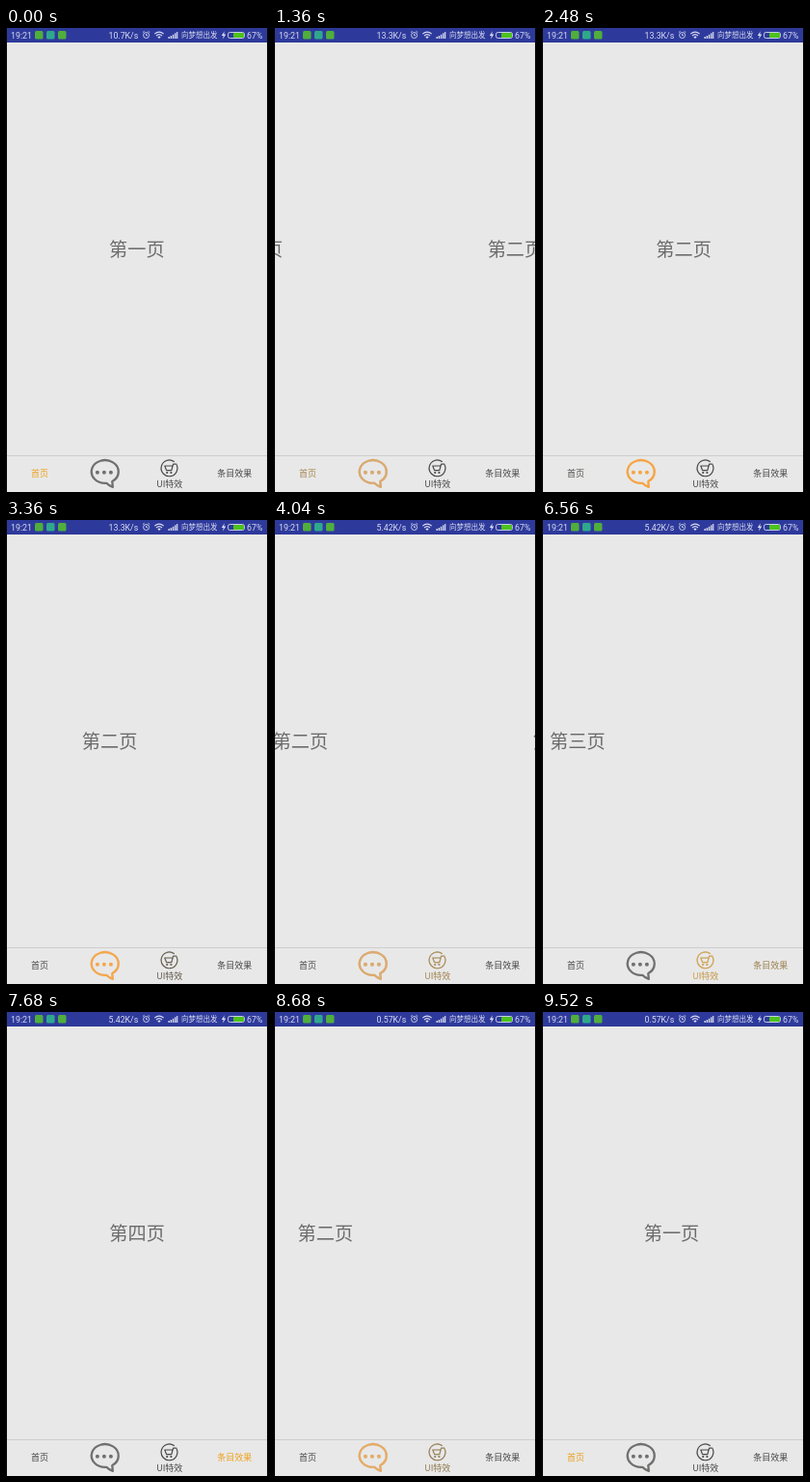
These frames come from a looping animation (272x480 px, 9.56 s). An HTML page:

```html
<!DOCTYPE html>
<html lang="zh-CN">
<head>
<meta charset="utf-8">
<title>底部标签渐变</title>
<style>
  @property --p { syntax: "<number>"; inherits: true; initial-value: 0; }

  html, body { margin: 0; width: 100%; height: 100%; overflow: hidden; background: #e8e8e8; }
  svg { display: block; width: 272px; height: 480px; }
  text { font-family: "Noto Sans CJK SC", "Noto Sans CJK", "Noto Sans", sans-serif; }

  /* --p is the pager position, counted in pages */
  .stage { --p: 0; animation: swipe 9560ms linear infinite; }
  .pages { transform: translateX(calc(var(--p) * -270px)); }
  .pages text { font-size: 19.2px; fill: #6c6c6c; text-anchor: middle; }

  .tab { --near: max(0, 1 - max(var(--p) - var(--i), var(--i) - var(--p))); }
  .label { font-size: 9px; fill: currentColor; text-anchor: middle; }
  .idle { color: #484848; opacity: calc(1 - var(--near)); }
  .active { color: #eda21c; opacity: var(--near); }
  .icon .idle { color: #707070; }
  .icon .active { color: #f8a23c; }

  .status { fill: #d9dcf1; }
  .status text { font-family: Roboto, "Noto Sans", sans-serif; font-size: 8.8px; }
  .status .carrier { font: 500 7.5px "Noto Sans CJK SC", "Noto Sans CJK", sans-serif; }
  .line { fill: none; stroke: #d9dcf1; stroke-width: .9; }
  .speeds { text-anchor: end; animation: speed 9560ms step-end infinite; }

  @keyframes swipe {
    0%      { --p: 0; }
    14.226% { --p: .576; }
    23.64%  { --p: .7; animation-timing-function: cubic-bezier(.22, 1, .36, 1); }
    30.65%  { --p: 1; }
    32.64%  { --p: 1; }
    42.26%  { --p: 1.402; }
    51.26%  { --p: 1.65; animation-timing-function: cubic-bezier(.22, 1, .36, 1); }
    58.26%  { --p: 2; }
    59.83%  { --p: 2; }
    74.69%  { --p: 2.62; animation-timing-function: cubic-bezier(.22, 1, .36, 1); }
    81.6%   { --p: 3; }
    83.47%  { --p: 3; animation-timing-function: cubic-bezier(.25, .5, .3, 1); }
    87.66%  { --p: 2; }
    89.12%  { --p: 2; animation-timing-function: cubic-bezier(.25, .5, .3, 1); }
    94.14%  { --p: 1; animation-timing-function: cubic-bezier(.25, .5, .3, 1); }
    99.58%, 100% { --p: .0055; }
  }
  @keyframes speed {
    0%     { transform: translateY(0); }
    1.05%  { transform: translateY(-20px); }
    42.05% { transform: translateY(-40px); }
    83.68%, 100% { transform: translateY(-60px); }
  }
</style>
</head>
<body>
<svg class="stage" viewBox="0 0 272 480">
  <defs>
    <clipPath id="bar"><rect width="272" height="15"/></clipPath>
    <text id="home" class="label" x="35" y="464.4">首页</text>
    <g id="chat">
      <path d="M110.3 469L110.8 474.8Q106.8 473.6 104.3 470.8A14 11.9 0 1 1 110.3 469Z"
        fill="none" stroke="currentColor" stroke-width="2.3" stroke-linejoin="round"/>
      <g fill="currentColor">
        <circle cx="94.9" cy="459.8" r="2"/>
        <circle cx="101.9" cy="459.8" r="2"/>
        <circle cx="108.9" cy="459.8" r="2"/>
      </g>
    </g>
    <g id="cart">
      <g fill="none" stroke="currentColor" stroke-width="1.2" stroke-linecap="round" stroke-linejoin="round">
        <path d="M176.7 451A8.4 8.4 0 1 1 174.4 448.5"/>
        <path d="M175.6 451.2H173.6L171.8 457.6H166.6L164.8 453H172.6"/>
      </g>
      <circle cx="167.2" cy="460" r="1.1" fill="currentColor"/>
      <circle cx="171.4" cy="460" r="1.1" fill="currentColor"/>
      <text class="label" x="169.8" y="474.8">UI特效</text>
    </g>
    <text id="items" class="label" x="237.3" y="464.4">条目效果</text>
  </defs>

  <rect width="272" height="480" fill="#e8e8e8"/>

  <g class="pages">
    <text x="136" y="236">第一页</text>
    <text x="406" y="236">第二页</text>
    <text x="676" y="236">第三页</text>
    <text x="946" y="236">第四页</text>
  </g>

  <rect y="442" width="272" height="1" fill="#cdcdcd"/>
  <g class="tab" style="--i:0"><use href="#home" class="idle"/><use href="#home" class="active"/></g>
  <g class="tab icon" style="--i:1"><use href="#chat" class="idle"/><use href="#chat" class="active"/></g>
  <g class="tab" style="--i:2"><use href="#cart" class="idle"/><use href="#cart" class="active"/></g>
  <g class="tab" style="--i:3"><use href="#items" class="idle"/><use href="#items" class="active"/></g>

  <rect width="272" height="15" fill="#2e3a9b"/>
  <g class="status">
    <text x="5" y="10.6">19:21</text>
    <rect x="30" y="3" width="8.5" height="8.5" rx="1.5" fill="#4fae3c"/>
    <rect x="42" y="3" width="8.5" height="8.5" rx="1.5" fill="#2fa88c"/>
    <rect x="54" y="3" width="8.5" height="8.5" rx="1.5" fill="#4fae3c"/>
    <g clip-path="url(#bar)">
      <g class="speeds">
        <text x="137.3" y="10.6">10.7K/s</text>
        <text x="137.3" y="30.6">13.3K/s</text>
        <text x="137.3" y="50.6">5.42K/s</text>
        <text x="137.3" y="70.6">0.57K/s</text>
      </g>
    </g>
    <g class="line">
      <circle cx="145.6" cy="7.5" r="3"/>
      <path d="M145.6 5.8V7.7H147M142 4.6L143.6 3.3M149.2 4.6L147.6 3.3"/>
      <path d="M154.3 6.2Q159 2 163.7 6.2M156 8Q159 5.3 162 8" stroke-width="1.1"/>
    </g>
    <path d="M157.3 9.2Q159 7.8 160.7 9.2L159 11Z"/>
    <path d="M168.5 9h1.4v2h-1.4zM170.7 8h1.4v3h-1.4zM172.9 6.7h1.4v4.3h-1.4zM175.1 5.3h1.4v5.7h-1.4zM177.1 4h1.2v7h-1.2z"/>
    <text class="carrier" x="182" y="10.2">向梦想出发</text>
    <path d="M226.8 3.3L223.8 8H225.8L225 11.5L228.3 6.6H226.2Z"/>
    <rect class="line" x="230.5" y="4.5" width="17" height="6" rx="2"/>
    <rect x="236" y="5" width="11" height="5" rx="1" fill="#4cc31c"/>
    <text x="250" y="10.6">67%</text>
  </g>

  <path d="M0 0h1v480h-1zM271 0h1v480h-1z" fill="#0a0a0a"/>
</svg>
</body>
</html>
```
